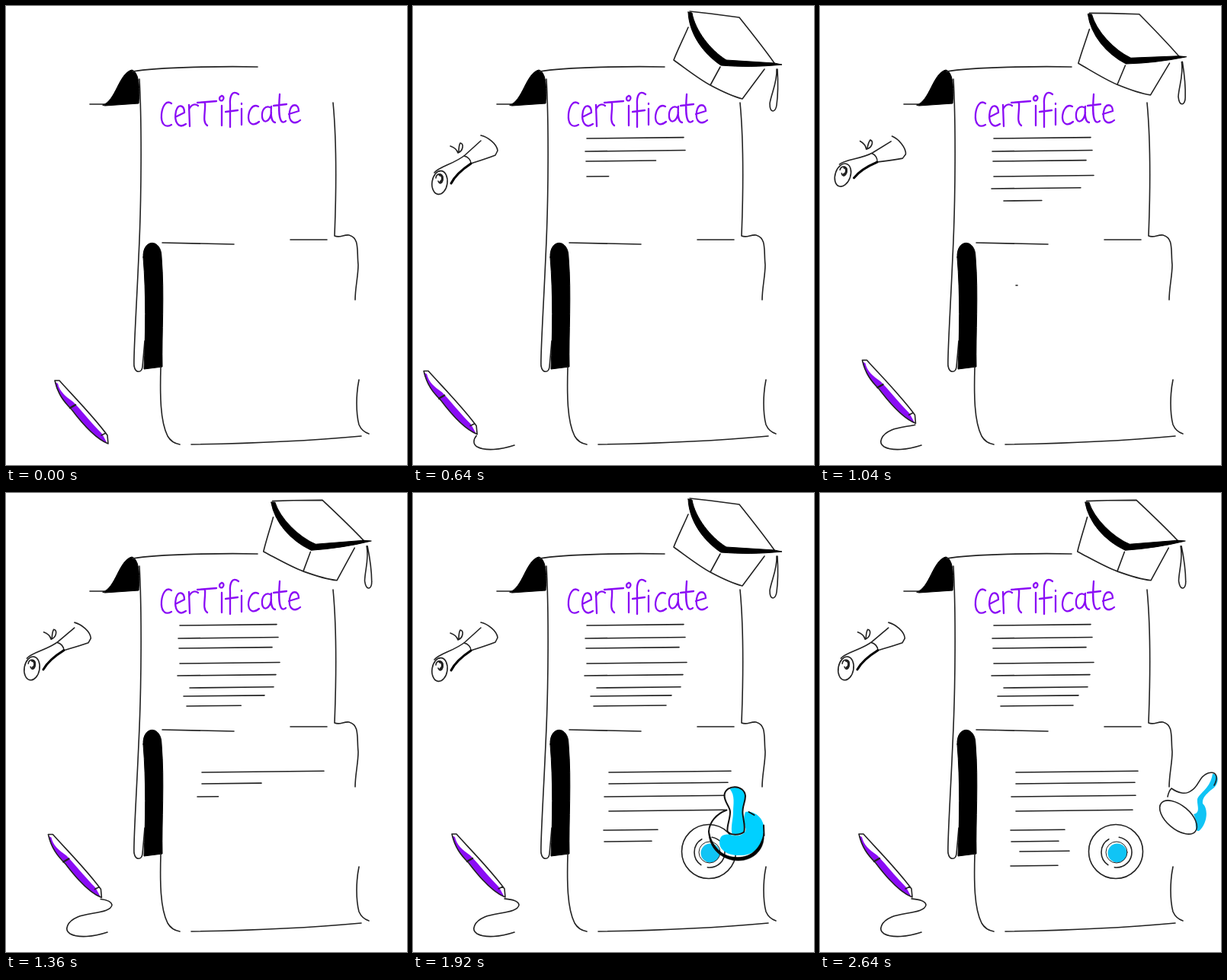
Write an HTML page that moves like this. It is 526 px wide and 603 px high and loops after 2.72 s.

```html
<!DOCTYPE html>
<html lang="en">
<head>
<meta charset="utf-8">
<title>Certificate</title>
<style>
  html, body { margin: 0; height: 100%; overflow: hidden; background: #fff; }
  svg { display: block; fill: none; stroke: #222; stroke-width: 1.6; stroke-linecap: round; stroke-linejoin: round; }
  .black { fill: #000; stroke: #000; stroke-width: 1; }
  .white { fill: #fff; stroke: none; }
  .blue { fill: #00d0ff; stroke: none; }
  .soft { fill: #10c4f5; stroke: none; }
  .purple { fill: #8a0cf5; stroke: none; }
  .bold { stroke: #111; stroke-width: 4; }
  #title { stroke: #8a0cf5; stroke-width: 2.3; }
</style>
</head>
<body>
<svg width="526" height="603" viewBox="0 0 526 603">
  <g id="paper">
    <path class="black" d="M127 130C144 125 148 88 165 84C174 86 176 106 174 128L130 131Z"/>
    <path d="M110 129H130M166 86C200 80 290 79 330 80M175 96C178 150 178 250 174 330C171 400 167 460 168 473C170 483 178 482 179 474L182 440"/>
    <path class="black" d="M180 330C179 305 204 305 204 330C208 380 204 430 205 474L181 477C183 430 184 380 180 330Z"/>
    <path d="M429 127C434 180 433 250 431 302C438 305 443 300 450 301C464 305 460 320 462 340C462 355 458 370 458 386"/>
    <path d="M205 311L299 313M373 307H421M203 474C202 510 202 545 212 565C216 572 222 575 228 576M243 576C310 575 400 571 466 565M463 491C459 510 459 535 463 550C466 557 470 560 476 562"/>
  </g>

  <g id="title" role="img" aria-label="certificate">
    <path d="M217 128C210 123 205 132 204 142C203 154 208 161 217 156"/>
    <path d="M222 146L234 140C234 130 226 128 223 138C220 152 226 162 236 155"/>
    <path d="M240 130L241 158M240 136C243 129 248 128 252 131"/>
    <path d="M251 127L276 125M261 127C262 140 257 152 264 157"/>
    <path d="M283 131V157M283 118C278 120 280 126 284 124C287 121 285 118 283 118"/>
    <path d="M305 116C297 110 293 118 294 130V159M288 139L304 137"/>
    <path d="M309 135V156M309 128V129"/>
    <path d="M331 132C323 128 318 138 318 147C319 157 326 157 332 152"/>
    <path d="M348 134C340 129 335 137 336 146C337 155 346 153 348 140M348 132C347 145 348 152 353 153"/>
    <path d="M359 116C358 130 357 145 361 151C363 154 366 152 367 151M351 131L368 129"/>
    <path d="M371 142L384 138C384 128 374 127 372 139C370 152 378 157 386 150"/>
  </g>

  <g id="lines"></g>

  <path id="signature" d="M133 577C115 583 95 585 84 579C76 574 80 563 94 557C108 551 138 552 139 541C138 535 128 534 120 533"/>
  <g id="pen">
    <path class="purple" d="M-70-82C-66-66-58-56-48-47C-36-30-18-8-1-1L-8-14C-22-28-36-46-46-56C-56-63-64-70-66-80Z"/>
    <path d="M0-1C-18-8-36-30-48-46C-58-56-66-66-70-84H-64C-50-68-20-38-1-12L0-1M-9-12L-3-15"/>
    <path d="M-50-48L-43-52" stroke-width="2.4"/>
  </g>

  <g id="cap">
    <path d="M363 7L390 10L428 15C440 30 460 55 474 75M361 28C355 42 347 58 342 71C360 84 375 96 390 104C405 112 420 119 432 122L461 83M403 80L390 104"/>
    <path class="black" d="M361 8L366 9C370 32 390 58 411 71L474 75L484 77C455 80 430 80 404 78C380 62 362 36 361 8Z"/>
    <path d="M477 83C478 100 470 115 468 128C468 142 476 140 477 130C479 115 479 100 478 83"/>
  </g>

  <g id="scroll">
    <ellipse cx="35" cy="232" rx="10" ry="15.5" transform="rotate(8 35 232)"/>
    <path d="M30 226C30 219 40 219 39 227C39 233 35 235 33 230"/>
    <path d="M35 222C39 222 40 229 36 231" stroke-width="3"/>
    <path d="M28 219C34 211 55 207 68 196L89 177M89 170C98 172 110 181 111 190L108 196C95 201 85 204 76 207M67 197C72 198 76 202 76 207"/>
    <path d="M50 233C55 223 64 215 76 207" stroke="#000" stroke-width="3"/>
    <path d="M49 184C55 186 58 190 59 193C66 190 67 181 62 180C60 183 60 188 60 192"/>
  </g>

  <g class="stamp white">
    <circle cx="387" cy="308" r="70"/>
    <circle cx="384" cy="210" r="27"/>
    <path d="M366 230H404V270H364Z"/>
  </g>
  <g id="mark">
    <circle cx="388" cy="471" r="35.5"/>
    <circle cx="389" cy="472" r="20" stroke-dasharray="34 9 40 14"/>
    <circle class="soft" cx="390" cy="473" r="12.5"/>
    <circle cx="389" cy="472" r="14" stroke-width="1"/>
  </g>
  <g class="stamp">
    <path class="blue" d="M411 250C440 247 460 270 460 295C458 330 445 362 400 364C365 366 343 350 343 330C344 310 355 309 368 309C395 318 412 307 412 295C409 280 404 268 411 250Z"/>
    <path class="black" d="M315 300C325 345 352 369 390 369C430 370 453 340 459 306C464 345 435 378 392 378C350 378 313 345 315 300Z"/>
    <path class="bold" d="M362 245C335 255 316 277 315 302C318 330 330 350 347 361M420 250L434 258M459 285L460 312"/>
    <path class="blue" d="M370 189C392 180 410 192 410 210C409 228 401 238 403 255C405 275 411 290 406 302C398 309 385 310 376 307C372 290 379 268 379 250C379 230 385 208 370 189Z"/>
    <path class="bold" d="M371 250C371 235 355 225 356 205C360 177 408 177 411 208C411 225 402 235 404 255C406 275 412 290 407 303C395 312 372 312 364 301C362 285 371 270 371 250Z"/>
  </g>

  <g id="resting">
    <path class="soft" d="M515 369C523 368 524 380 517 387C508 394 501 400 502 408C510 415 508 435 497 444C490 445 495 430 490 422C500 420 494 410 495 402C498 394 512 388 515 369Z"/>
    <ellipse cx="470" cy="426" rx="29" ry="15.5" transform="rotate(40 470 426)"/>
    <path d="M456 399C457 394 458 391 461 388C469 394 480 397 487 391C497 386 497 372 509 368C520 365 523 373 517 384"/>
  </g>
</svg>

<script>
const LOOP = 2720, STEP = 80, LINE_TIME = 320;
const $ = id => document.getElementById(id);
const clamp = v => Math.min(1, Math.max(0, v));

// x, y, length, start time
const lines = [
  [228, 174, 127, 280], [226, 191, 131, 320], [227, 204, 122, 400], [228, 224, 131, 570],
  [225, 240, 129, 750], [241, 256, 110, 895], [233, 267, 106, 1040], [237, 280, 95, 1120],
  [257, 367, 160, 1036], [257, 382, 156, 1200], [251, 399, 163, 1306], [257, 418, 153, 1465],
  [250, 443, 71, 1550], [251, 458, 62, 1600], [262, 471, 65, 1920], [250, 490, 62, 1960]
].map(([x, y, length, start]) => {
  const path = document.createElementNS("http://www.w3.org/2000/svg", "path");
  $("lines").append(path);
  return { path, x, y, length, start };
});

// time, x, y, scale of the stamp's base
const stampKeys = [
  [1440, 387, 312, 0.4], [1600, 387, 312, 1], [1760, 388, 471, 0.5],
  [1840, 388, 471, 0.5], [1920, 424, 450, 0.5], [2080, 480, 420, 0.5]
];

function stampAt(t) {
  const i = stampKeys.findIndex(key => key[0] > t);
  const a = stampKeys[i - 1], b = stampKeys[i];
  const p = (t - a[0]) / (b[0] - a[0]);
  return a.map((v, k) => v + (b[k] - v) * p);
}

const show = (el, on) => el.style.display = on ? "" : "none";
const wave = (t, period) => Math.cos(2 * Math.PI * t / period);
const signature = $("signature"), inkLength = signature.getTotalLength();
const stampParts = document.querySelectorAll(".stamp");

function draw(t) {
  for (const { path, x, y, length, start } of lines) {
    const w = length * clamp((t - start) / LINE_TIME);
    path.setAttribute("d", w ? `M${x} ${y}l${w} ${-w * 0.011}` : "");
  }

  const ink = inkLength * clamp((t - 40) / 1360);
  const tip = signature.getPointAtLength(ink);
  show(signature, ink > 0);
  signature.setAttribute("stroke-dasharray", `${ink} 999`);
  $("pen").setAttribute("transform", `translate(${tip.x + 1} ${tip.y - 1})`);

  show($("cap"), t > 0);
  show($("scroll"), t > 0);
  $("cap").setAttribute("transform", `rotate(${-4.2 * (1 + wave(t, 1280))} 382 104)`);
  $("scroll").setAttribute("transform", `rotate(${6.2 * (1 - wave(t, 640))} 86 200)`);

  const stamping = t >= 1440 && t < 2080;
  for (const part of stampParts) {
    show(part, stamping);
    if (!stamping) continue;
    const [, x, y, s] = stampAt(t);
    part.setAttribute("transform", `translate(${x} ${y}) scale(${s}) translate(-387 -312)`);
  }
  show($("mark"), t >= 1760);
  show($("resting"), t >= 2080);
}

const begin = performance.now();
function tick() {
  const elapsed = (performance.now() - begin) % LOOP;
  draw(Math.floor(elapsed / STEP) * STEP);
  requestAnimationFrame(tick);
}
tick();
</script>
</body>
</html>
```
